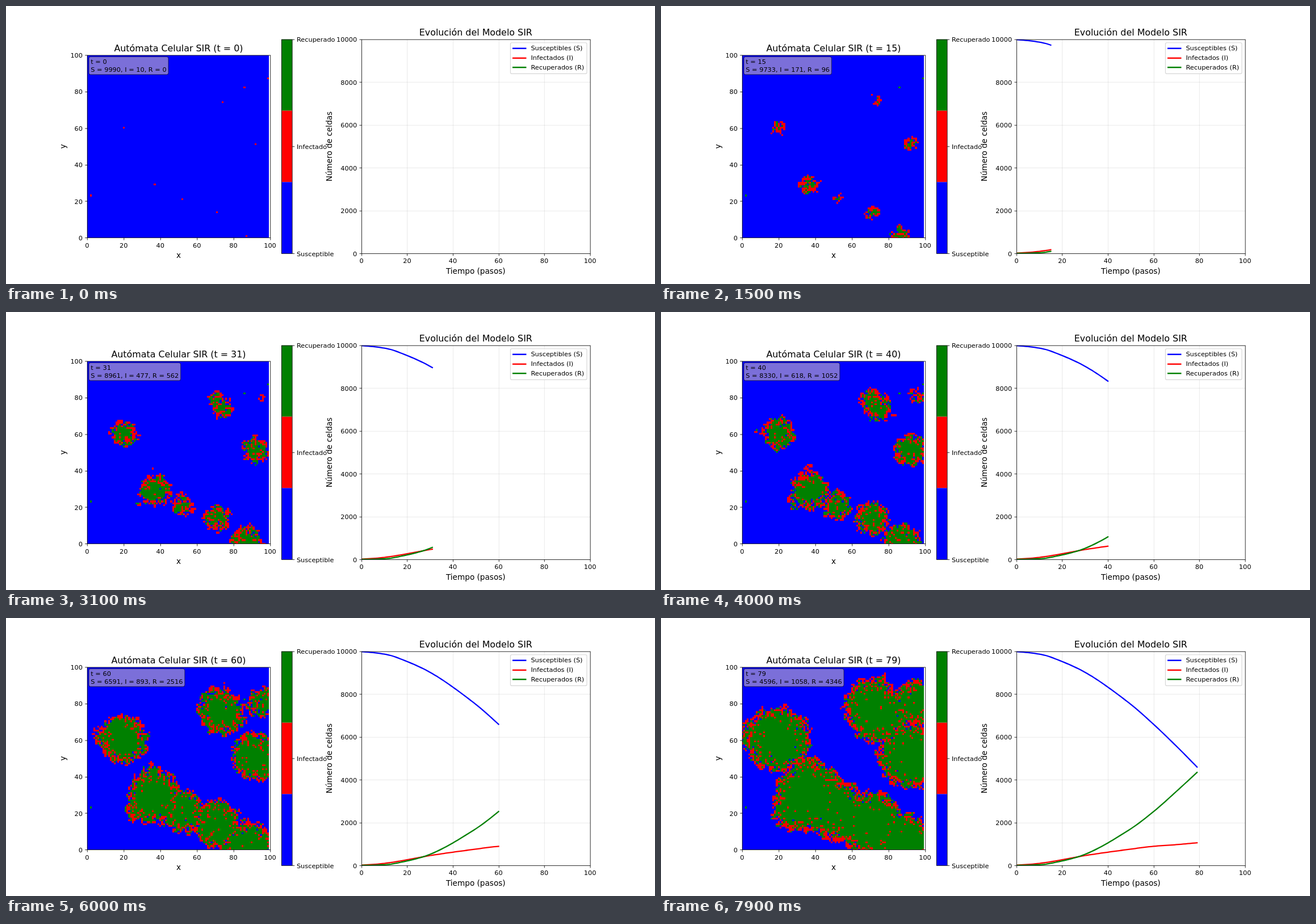
An HTML page with a canvas that plays this animation: 1143x490 px, repeating every 8 s.

```html
<!DOCTYPE html>
<html lang="es">
<head>
<meta charset="utf-8">
<title>Modelo SIR</title>
<style>
html, body { margin: 0; width: 100%; height: 100%; overflow: hidden; background: #fff; }
canvas { display: block; width: 1143px; height: 490px; }
</style>
</head>
<body>
<canvas id="stage"></canvas>
<script>
const W = 1143, H = 490, STEPS = 80, STEP_MS = 100, N = 100;
const BLUE = '#0000ff', RED = '#ff0000', GREEN = '#008000';
const TICK = 11.34, LABEL = 13.61, TITLE = 15.88;
const HAIR = .82, THICK = 2.27;
const MAP = { x: 142.9, y: 86.4, w: 322.1, h: 322.1 };
const BAR = { x: 485.1, y: 58.8, w: 18.9, h: 377.3 };
const PLOT = { x: 626, y: 58.8, w: 402.6, h: 377.3 };

const stage = document.getElementById('stage');
const ratio = window.devicePixelRatio || 1;
stage.width = Math.round(W * ratio);
stage.height = Math.round(H * ratio);
const ctx = stage.getContext('2d');
ctx.scale(ratio, ratio);

// Key points of the epidemic: step, infected, recovered
const KEYS = [
  [0, 10, 0], [8, 72, 24], [15, 171, 96], [31, 477, 562],
  [49, 748, 1640], [60, 893, 2516], [71, 979, 3559], [79, 1058, 4346]
];

function smoothAt(t, col) {
  let i = 0;
  while (i < KEYS.length - 2 && t > KEYS[i + 1][0]) i++;
  const slope = j => {
    const a = KEYS[Math.max(j - 1, 0)], b = KEYS[Math.min(j + 1, KEYS.length - 1)];
    return (b[col] - a[col]) / (b[0] - a[0]);
  };
  const a = KEYS[i], b = KEYS[i + 1], d = b[0] - a[0], u = (t - a[0]) / d;
  const u2 = u * u, u3 = u2 * u;
  return (2 * u3 - 3 * u2 + 1) * a[col] + (u3 - 2 * u2 + u) * d * slope(i)
    + (3 * u2 - 2 * u3) * b[col] + (u3 - u2) * d * slope(i + 1);
}

const history = Array.from({ length: STEPS }, (_, t) => {
  const i = Math.round(smoothAt(t, 1)), r = Math.round(smoothAt(t, 2));
  return { s: N * N - i - r, i, r };
});

let state = 20417;
function random() {
  state = (state + 0x6D2B79F5) | 0;
  let v = Math.imul(state ^ (state >>> 15), 1 | state);
  v = (v + Math.imul(v ^ (v >>> 7), 61 | v)) ^ v;
  return ((v ^ (v >>> 14)) >>> 0) / 4294967296;
}
const expo = mean => -mean * Math.log(1 - random());

// First cases and later branches: x, y, step at which they start to spread
const NEVER = 1e6, SPEED = .25;
const SEEDS = [
  [20, 60, 0], [2, 23, NEVER], [37, 29, -6], [52, 21, 5], [71, 14, 0],
  [87, 1, -6], [92, 51, 0], [74, 74, 6], [86, 82, NEVER], [99, 87, 50]
];
const BRANCHES = [
  [8, 62, 33], [12, 72, 55], [28, 22, 25], [36, 41, 30], [47, 37, 45],
  [71, 78, 10], [75, 91, 56], [82, 70, 34], [96, 80, 20]
];

function infectionTimes() {
  const foci = [...SEEDS, ...BRANCHES];
  const due = new Float64Array(N * N), time = new Float64Array(N * N).fill(NEVER);
  for (let y = 0; y < N; y++) for (let x = 0; x < N; x++) {
    const front = Math.min(...foci.map(([fx, fy, t]) => t + Math.hypot(x - fx, y - fy) / SPEED));
    const lumps = 2.5 * (Math.sin(x * .9 + y * .5) + Math.sin(y * .8 - x * .6));
    due[y * N + x] = front + lumps + expo(6);
  }
  BRANCHES.forEach(([x, y, t]) => { time[y * N + x] = t; });
  SEEDS.forEach(([x, y], k) => { time[y * N + x] = k - 100; });
  // A cell falls ill only next to one that already has
  for (let changed = true; changed;) {
    changed = false;
    for (let y = 0; y < N; y++) for (let x = 0; x < N; x++) {
      const c = y * N + x;
      let near = NEVER;
      for (let v = Math.max(y - 1, 0); v <= Math.min(y + 1, N - 1); v++)
        for (let u = Math.max(x - 1, 0); u <= Math.min(x + 1, N - 1); u++)
          if (u !== x || v !== y) near = Math.min(near, time[v * N + u]);
      const t = Math.max(due[c], near + .5);
      if (t < time[c]) { time[c] = t; changed = true; }
    }
  }
  return time;
}

function ranks(values) {
  const rank = new Uint16Array(values.length);
  Array.from(values.keys()).sort((a, b) => values[a] - values[b]).forEach((c, k) => { rank[c] = k; });
  return rank;
}

const illRank = ranks(infectionTimes());
const healRank = ranks(Float64Array.from(illRank, k => {
  if (k < SEEDS.length) return 5 + k / 2;
  const start = history.findIndex(h => N * N - h.s > k);
  return (start < 0 ? NEVER : start) + .5 + expo(10);
}));

const cells = document.createElement('canvas');
cells.width = cells.height = N;
const cellCtx = cells.getContext('2d');

function paintCells({ s, r }) {
  cellCtx.fillStyle = BLUE;
  cellCtx.fillRect(0, 0, N, N);
  for (let c = 0; c < N * N; c++) {
    if (illRank[c] >= N * N - s) continue;
    cellCtx.fillStyle = healRank[c] < r ? GREEN : RED;
    cellCtx.fillRect(c % N, N - 1 - Math.floor(c / N), 1, 1);
  }
}

// Straight lines sit on the pixel centres of a 1400 by 600 figure
const FIGURE_PX = W / 1400;
const snap = v => (Math.floor(v / FIGURE_PX + .5) + .5) * FIGURE_PX;

function text(str, x, y, size, align = 'left') {
  ctx.font = `${size}px "DejaVu Sans", sans-serif`;
  ctx.textAlign = align;
  ctx.fillStyle = '#000';
  ctx.fillText(str, x, y);
}

function sideText(str, x, y) {
  ctx.save();
  ctx.translate(x, y);
  ctx.rotate(-Math.PI / 2);
  text(str, 0, 0, LABEL, 'center');
  ctx.restore();
}

function line(x1, y1, x2, y2, color, width = HAIR) {
  ctx.strokeStyle = color;
  ctx.lineWidth = width;
  ctx.beginPath();
  ctx.moveTo(snap(x1), snap(y1));
  ctx.lineTo(snap(x2), snap(y2));
  ctx.stroke();
}

function box(x, y, w, h, r, fill, edge) {
  ctx.beginPath();
  ctx.roundRect(x, y, w, h, r);
  ctx.fillStyle = fill;
  ctx.fill();
  ctx.strokeStyle = edge;
  ctx.lineWidth = 1.13;
  ctx.stroke();
}

function clipTo(a, draw) {
  ctx.save();
  ctx.beginPath();
  ctx.rect(a.x, a.y, a.w, a.h);
  ctx.clip();
  draw();
  ctx.restore();
}

function spines(a) {
  const x = snap(a.x), y = snap(a.y);
  ctx.strokeStyle = '#000';
  ctx.lineWidth = HAIR;
  ctx.strokeRect(x, y, snap(a.x + a.w) - x, snap(a.y + a.h) - y);
}

function axes(a, yMax, title, xLabel) {
  const bottom = a.y + a.h;
  spines(a);
  for (let k = 0; k <= 5; k++) {
    const x = a.x + a.w * k / 5, y = bottom - a.h * k / 5;
    line(x, bottom, x, bottom + 4, '#000');
    line(a.x - 4, y, a.x, y, '#000');
    text(String(k * 20), x, bottom + 17, TICK, 'center');
    text(String(yMax * k / 5), a.x - 7.9, y + 4.5, TICK, 'right');
  }
  text(title, a.x + a.w / 2, a.y - 6.4, TITLE, 'center');
  text(xLabel, a.x + a.w / 2, bottom + 35.8, LABEL, 'center');
}

function drawMap(t) {
  const now = history[t], unit = MAP.w / N, stretch = 1.3;
  paintCells(now);
  clipTo(MAP, () => {
    ctx.imageSmoothingEnabled = false;
    ctx.drawImage(cells, MAP.x - unit / 2, MAP.y + unit / 2 - stretch, MAP.w, MAP.h + stretch);
  });
  axes(MAP, 100, `Autómata Celular SIR (t = ${t})`, 'x');
  sideText('y', 105.4, 247.5);

  const counts = `S = ${now.s}, I = ${now.i}, R = ${now.r}`;
  ctx.font = `${TICK}px "DejaVu Sans", sans-serif`;
  const width = ctx.measureText(counts).width;
  box(145.9, 89.5, width + 6.8, 31.4, 3.4, 'rgba(245,222,179,.5)', 'rgba(0,0,0,.5)');
  text(`t = ${t}`, 149.3, 102.3, TICK);
  text(counts, 149.3, 115.5, TICK);
}

function drawBar() {
  [GREEN, RED, BLUE].forEach((color, k) => {
    ctx.fillStyle = color;
    ctx.fillRect(BAR.x, BAR.y + BAR.h * k / 3, BAR.w, BAR.h / 3);
  });
  spines(BAR);
  ['Recuperado', 'Infectado', 'Susceptible'].forEach((name, k) => {
    const x = BAR.x + BAR.w, y = BAR.y + BAR.h * k / 2;
    line(x, y, x + 4, y, '#000');
    text(name, x + 7.9, y + 4.4, TICK);
  });
}

function drawCurve(key, color, t) {
  if (!t) return;
  ctx.strokeStyle = color;
  ctx.lineWidth = THICK;
  ctx.lineCap = 'square';
  ctx.lineJoin = 'round';
  ctx.beginPath();
  for (let k = 0; k <= t; k++)
    ctx.lineTo(PLOT.x + PLOT.w * k / 100, PLOT.y + PLOT.h * (1 - history[k][key] / 10000));
  ctx.stroke();
}

function drawPlot(t) {
  const series = [['s', BLUE, 'Susceptibles (S)'], ['i', RED, 'Infectados (I)'], ['r', GREEN, 'Recuperados (R)']];
  const grid = 'rgba(176,176,176,.35)';
  for (let k = 1; k < 5; k++) {
    const x = PLOT.x + PLOT.w * k / 5, y = PLOT.y + PLOT.h * k / 5;
    line(x, PLOT.y, x, PLOT.y + PLOT.h, grid);
    line(PLOT.x, y, PLOT.x + PLOT.w, y, grid);
  }
  clipTo(PLOT, () => series.forEach(([key, color]) => drawCurve(key, color, t)));
  axes(PLOT, 10000, 'Evolución del Modelo SIR', 'Tiempo (pasos)');
  sideText('Número de celdas', 574.3, 247.5);
  box(888.4, 64.7, 134.6, 54.7, 2.3, 'rgba(255,255,255,.8)', 'rgba(204,204,204,.8)');
  series.forEach(([, color, name], k) => {
    const y = 74.1 + k * 17;
    line(891.8, y, 916, y, color, 2.45);
    text(name, 924.4, y + 4.2, TICK);
  });
}

function render(t) {
  ctx.fillStyle = '#fff';
  ctx.fillRect(0, 0, W, H);
  drawMap(t);
  drawBar();
  drawPlot(t);
}

let shown = -1;
function tick() {
  const t = Math.floor(performance.now() / STEP_MS) % STEPS;
  if (t !== shown) render(shown = t);
  requestAnimationFrame(tick);
}
tick();
</script>
</body>
</html>
```
